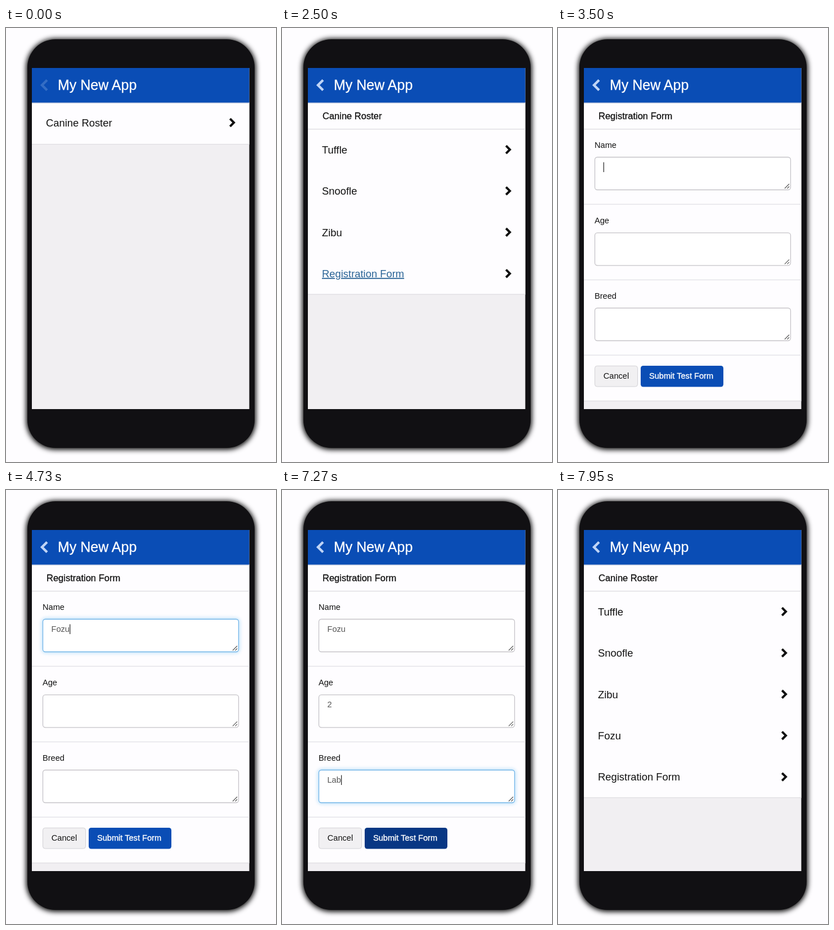
An HTML page that plays this animation: 480x771 px, repeating every 8 s.

```html
<!DOCTYPE html>
<html lang="en">
<head>
<meta charset="utf-8">
<title>My New App</title>
<style>
  html, body { margin: 0; width: 100%; height: 100%; overflow: hidden; background: #fefdff; }
  svg { position: absolute; inset: 0; width: 480px; height: 771px; }
  .phone {
    position: absolute; left: 38px; top: 20px; width: 404px; height: 726px;
    border-radius: 50px; background: #111013; box-shadow: 0 1px 10px 2px #000;
  }
  text { font-family: "Liberation Sans", Arial, sans-serif; fill: #111; white-space: pre; }
  .title { font-size: 25px; fill: #fff; stroke: #fff; stroke-width: .3; }
  .heading { font-size: 16.5px; stroke: #111; stroke-width: .3; }
  .row { font-size: 18.4px; }
  .label, .value { font-size: 14.6px; }
  .value { fill: #555; }
  .strong { fill: #fff; stroke: #fff; stroke-width: .35; }
  .chevron { fill: none; stroke: #111; stroke-width: 4; }
  .box { fill: #fff; stroke-width: 1.3; }
  .glow { fill: none; stroke: #66bdf0; stroke-width: 2; filter: blur(3px); }
  .grip { stroke: #555; stroke-width: 1.1; }
  .caret { stroke: #222; stroke-width: 1.2; }
</style>
</head>
<body>
<div class="phone"></div>
<svg viewBox="0 0 480 771">
  <defs><clipPath id="screen"><rect x="46" y="71" width="386.5" height="606"/></clipPath></defs>
  <g id="app" clip-path="url(#screen)"></g>
</svg>
<script>
const LOOP = 8000;
const FADE = 300;
const NAME = 'Fozu';
const APP = 'Canine Roster';
const PETS = ['Tuffle', 'Snoofle', 'Zibu'];
const FORM = 'Registration Form';

const OPEN_LIST = 1345, OPEN_FORM = 2665, CLOSE_FORM = 7500;
const HOVER_APP = 1100, HOVER_FORM = 2450, HOVER_SUBMIT = 7150;

const fields = [
  { label: 'Name', y: 229.5, text: NAME, focus: 3500, blur: 5250, keys: [4040, 4220, 4390, 4560] },
  { label: 'Age', y: 363.8, text: '2', focus: 5250, blur: 6015, keys: [5640] },
  { label: 'Breed', y: 497.5, text: 'Lab', focus: 6015, blur: LOOP, keys: [6600, 6800, 6990] }
];

const app = document.getElementById('app');

function add(parent, tag, attrs = {}, content = '') {
  const node = document.createElementNS('http://www.w3.org/2000/svg', tag);
  for (const key in attrs) node.setAttribute(key, attrs[key]);
  node.textContent = content;
  parent.append(node);
  return node;
}
const rect = (parent, x, y, width, height, attrs) =>
  add(parent, 'rect', { x, y, width, height, ...attrs });
const text = (parent, x, y, cls, content) => add(parent, 'text', { x, y, class: cls }, content);
const rule = (parent, y, color = '#e2e1e6') => rect(parent, 46, y, 387, 1.3, { fill: color });

function panel(bottom) {
  const group = add(app, 'g');
  rect(group, 46, 132, 387, bottom - 132, { fill: '#fefdff' });
  rule(group, bottom - .6, '#dfdee2');
  return group;
}

function row(parent, y, content) {
  add(parent, 'path', { class: 'chevron', d: `M398.3 ${y - 6.8}l6.8 6.8l-6.8 6.8` });
  return text(parent, 71, y + 6.7, 'row', content);
}

function list(items) {
  const group = panel(179.5 + items.length * 73.4);
  text(group, 72, 161.5, 'heading', APP);
  rule(group, 179, '#dcdbe0');
  const rows = items.map((item, i) => row(group, 216 + i * 73.4, item));
  return { group, last: rows[rows.length - 1] };
}

function form() {
  const group = panel(662.5);
  text(group, 72, 161.5, 'heading', FORM);
  rule(group, 179, '#dcdbe0');
  for (const f of fields) {
    const shape = { rx: 4.5 };
    text(group, 65, f.y - 16.7, 'label', f.label);
    f.glow = rect(group, 65.5, f.y, 348, 58, { ...shape, class: 'glow' });
    f.box = rect(group, 65.5, f.y, 348, 58, { ...shape, class: 'box' });
    f.value = text(group, 80.5, f.y + 22.5, 'value', '');
    f.caret = add(group, 'path', { class: 'caret' });
    add(group, 'path', { class: 'grip', d: `M403 ${f.y + 55.5}l8 -8M407.5 ${f.y + 55.5}l3.5 -3.5` });
    rule(group, f.y + 83);
  }
  rect(group, 65.5, 600.3, 76, 36.7, { rx: 4, fill: '#f1f0f2', stroke: '#d2d1d5' });
  text(group, 80.8, 623, 'label', 'Cancel');
  const submit = rect(group, 147, 600, 147, 37.5, { rx: 4.5 });
  text(group, 162, 623, 'label strong', 'Submit Test Form');
  return { group, submit };
}

rect(app, 46, 71, 387, 606, { fill: '#f1eff2' });

const home = panel(206.5);
const homeRow = row(home, 168, APP);
const before = list([...PETS, FORM]);
const entry = form();
const after = list([...PETS, NAME, FORM]);

rect(app, 46, 132, 387, 2, { fill: '#b9c3d8', opacity: .7 });
rect(app, 46, 71, 387, 61.5, { fill: '#0a4db5' });
const back = add(app, 'path', {
  class: 'chevron', style: 'stroke:#d9e8ff;stroke-width:4.4', d: 'M73 92.5l-9 9l9 9'
});
text(app, 92, 110, 'title', 'My New App');

const ramp = (t, start, length) => Math.min(1, Math.max(0, (t - start) / length));
const mix = (a, b, p) => `rgb(${a.map((v, i) => Math.round(v + (b[i] - v) * p))})`;

function show(group, opacity) {
  group.style.opacity = opacity;
  group.style.display = opacity ? '' : 'none';
}

function drawField(f, t) {
  const focus = ramp(t, f.focus, 150) * (1 - ramp(t, f.blur, 150));
  f.glow.style.opacity = focus;
  f.box.style.stroke = mix([197, 195, 200], [112, 180, 232], focus);
  f.value.textContent = f.text.slice(0, f.keys.filter(key => t >= key).length);
  const x = 81.3 + (f.value.textContent ? f.value.getComputedTextLength() : 0);
  f.caret.setAttribute('d', `M${x} ${f.y + 9}v17.5`);
  f.caret.style.display = t >= f.focus && t < f.blur ? '' : 'none';
}

function draw(t) {
  const toList = ramp(t, OPEN_LIST, FADE);
  const toForm = ramp(t, OPEN_FORM, FADE);
  const toEnd = ramp(t, CLOSE_FORM, FADE);
  show(home, 1 - toList);
  show(before.group, toList * (1 - toForm));
  show(entry.group, toForm * (1 - toEnd));
  show(after.group, toEnd);
  back.style.opacity = .2 + .68 * ramp(t, OPEN_LIST, 600);

  homeRow.style.fill = t >= HOVER_APP ? '#2a6496' : '';
  before.last.style.fill = t >= HOVER_FORM ? '#2a6496' : '';
  before.last.style.textDecoration = t >= HOVER_FORM ? 'underline' : '';
  entry.submit.style.fill = t >= HOVER_SUBMIT ? '#083784' : '#0a4db5';
  for (const f of fields) drawField(f, t);
}

const start = performance.now();
function tick() {
  draw((performance.now() - start) % LOOP);
  requestAnimationFrame(tick);
}
tick();
</script>
</body>
</html>
```
